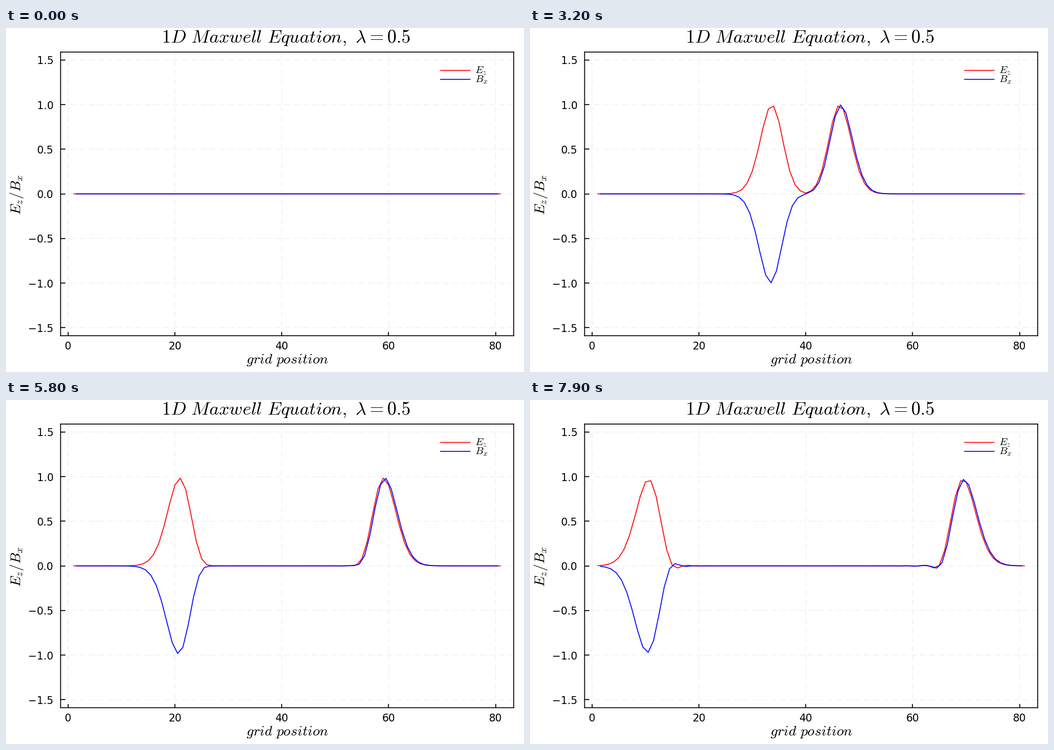
Animation of 917 by 611 pixels, one loop 8 s. Source, as a matplotlib script:

```python
import matplotlib.pyplot as plt
import numpy as np
from matplotlib.animation import FuncAnimation
from matplotlib.lines import Line2D

W, H, DPI = 917, 611, 64
PX = 72 / DPI  # points per pixel
FRAMES = 80
CELLS = 81
SOURCE = 40
LAM = 0.5
LINE = 1.6 * PX

plt.rcParams.update({
    "font.family": "DejaVu Sans",
    "mathtext.fontset": "cm",
    "axes.unicode_minus": True,
})


def simulate():
    """Staggered leapfrog scheme with a Gaussian pulse and open ends."""
    e, b = np.zeros(CELLS), np.zeros(CELLS - 1)
    mur = (LAM - 1) / (LAM + 1)
    states = []
    for n in range(1, FRAMES + 1):
        old = e.copy()
        e[1:-1] -= LAM * np.diff(b)
        e[SOURCE - 1] = np.exp(-((n - 20) / 6) ** 2)
        e[0] = old[1] + mur * (e[1] - old[0])
        e[-1] = old[-2] + mur * (e[-2] - old[-1])
        b -= LAM * np.diff(e)
        states.append((e.copy(), b.copy()))
    return states


fig = plt.figure(figsize=(W / DPI, H / DPI), dpi=DPI, facecolor="white")


def label(x, y, text, size, ha="center", **kw):
    fig.text(x / W, 1 - y / H, text, fontsize=size * PX, ha=ha,
             va="baseline", color="black", **kw)


def legend_entry(y, base, color, text):
    fig.add_artist(Line2D([768.5 / W, 822.3 / W], [1 - y / H] * 2, color=color,
                          lw=LINE, solid_capstyle="butt", snap=False))
    label(829.8, base, text, 18.57, ha="left")


left, right, top, bottom = 96.6, 898.7, 42.7, 546.5
ax = fig.add_axes([left / W, 1 - bottom / H, (right - left) / W, (bottom - top) / H])
ax.set(xlim=(-1.4, 83.4), ylim=(-1.59, 1.59),
       xticks=range(0, 81, 20), yticks=np.arange(-3, 4) / 2)
ax.set_axisbelow(True)
ax.grid(color="#ededed", lw=1.1 * PX, dashes=(9.5, 5.5), snap=False)
ax.tick_params(direction="in", length=7.5 * PX, width=LINE, labelsize=18.5 * PX)
ax.tick_params(axis="x", pad=9.8 * PX)
ax.tick_params(axis="y", pad=12.5 * PX)
for spine in ax.spines.values():
    spine.set(linewidth=LINE, color="black", snap=False)

label(495.3, 25.5, r"$1D\ Maxwell\ Equation,\ \lambda = 0.5$", 32.5)
label(497.7, 595.6, r"$grid\ position$", 25.5)
label(25.5, 295.5, r"$E_z/B_x$", 25.5, rotation=90, rotation_mode="anchor")
legend_entry(75.4, 80.6, "red", "$E_z$")
legend_entry(91.3, 96.4, "blue", "$B_x$")

grid = np.arange(1, CELLS + 1)
style = dict(lw=LINE, solid_capstyle="butt", snap=False)
e_line, = ax.plot(grid, 0 * grid, color="red", **style)
b_line, = ax.plot(grid[:-1] + 0.5, 0 * grid[:-1], color="blue", **style)
states = simulate()


def update(i):
    e, b = states[i]
    e_line.set_ydata(e)
    b_line.set_ydata(b)
    return e_line, b_line


anim = FuncAnimation(fig, update, frames=FRAMES, interval=100,
                     repeat=True, repeat_delay=0, blit=False)
plt.show()
```
